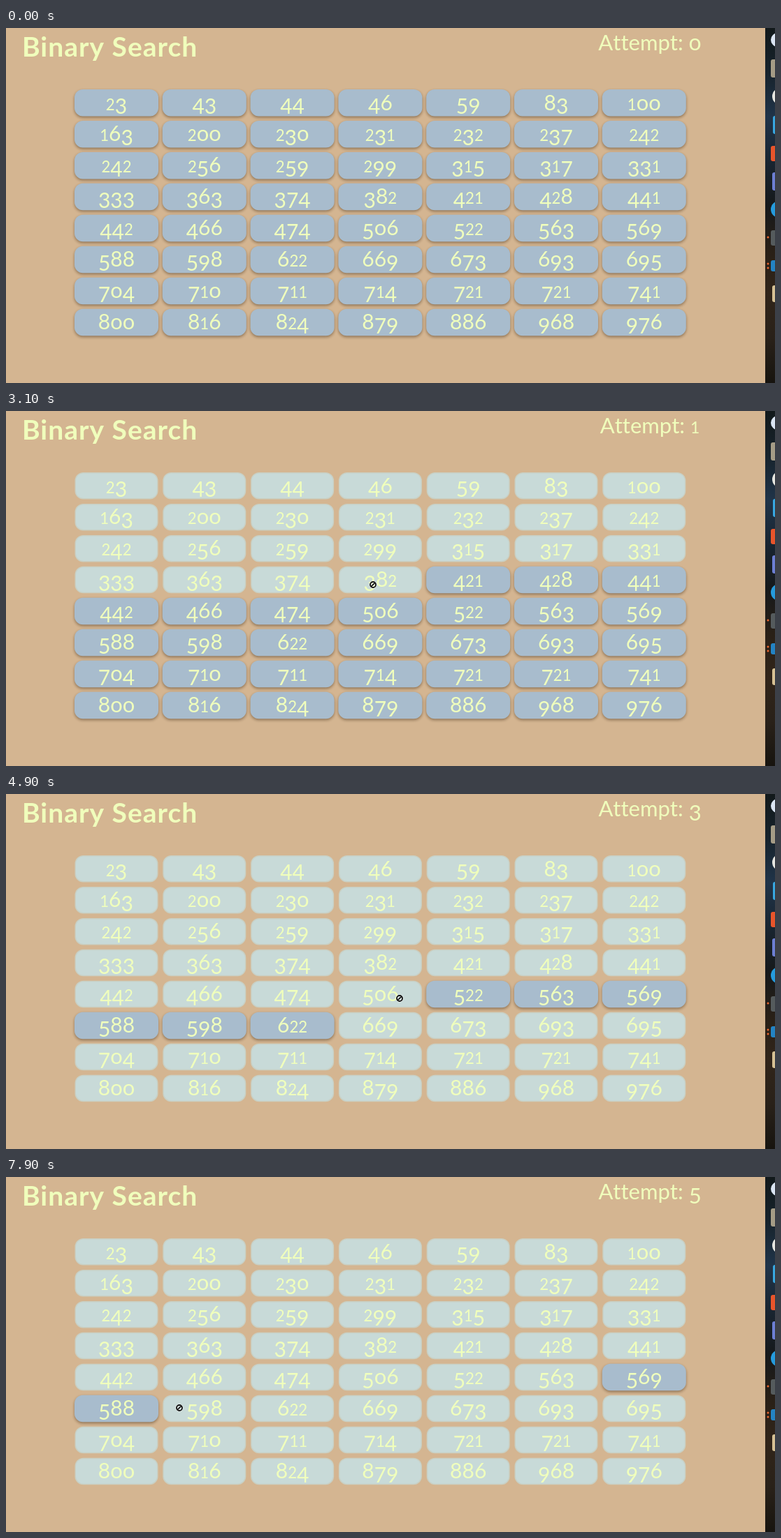
Animation, 1100 px wide and 509 px high, one loop 8000 ms. Source, as an HTML page with a canvas:

```html
<!DOCTYPE html>
<html lang="en">
<head>
<meta charset="utf-8">
<title>Binary Search</title>
<style>
html, body { margin: 0; width: 100%; height: 100%; overflow: hidden; background: #d4b591; }
canvas { display: block; }
</style>
</head>
<body>
<canvas id="stage" width="1100" height="509"></canvas>
<script>
const ctx = document.getElementById('stage').getContext('2d');
const LOOP = 8000;
const INK = '#f0ffbc';
const numbers = `23 43 44 46 59 83 100 163 200 230 231 232 237 242
  242 256 259 299 315 317 331 333 363 374 382 421 428 441
  442 466 474 506 522 563 569 588 598 622 669 673 693 695
  704 710 711 714 721 721 741 800 816 824 879 886 968 976`.split(/\s+/);

// Search range [lo, hi) from each time on
const ranges = [
  [0, 0, 56], [1600, 25, 56], [3900, 25, 38], [4900, 32, 38], [6200, 34, 38], [7400, 34, 36]
];
// Button held down: start, end, index
const presses = [[3800, 3900, 38], [4800, 4900, 31], [6100, 6200, 33], [7300, 7400, 36]];
// Pointer: time, x, y, shape
const pointer = [
  [0, 0, 0, null],
  [800, 144, 20, arrow], [900, 224, 66, arrow], [1000, 342, 140, hand], [1100, 450, 208, hand],
  [1200, 504, 234, hand], [1400, 522, 242, hand], [1600, 521, 243, blocked],
  [3100, 525, 249, blocked], [3200, 535, 266, arrow], [3300, 545, 284, hand], [3400, 551, 298, hand],
  [3600, 558, 318, hand], [3700, 561, 327, hand], [3800, 562, 329, hand], [3900, 562, 330, blocked],
  [4600, 563, 317, blocked], [4700, 564, 300, hand], [4800, 563, 293, hand], [4900, 563, 293, blocked],
  [5500, 580, 292, hand], [5600, 700, 302, hand], [5700, 802, 299, hand],
  [5900, 804, 298, hand], [6200, 807, 298, blocked], [6500, 802, 298, blocked],
  [6700, 730, 312, blocked], [6800, 569, 348, blocked], [6900, 330, 351, hand], [7000, 232, 345, hand],
  [7200, 258, 336, hand], [7300, 272, 332, hand], [7400, 273, 332, blocked],
  [7700, 268, 332, blocked], [7900, 248, 331, blocked]
];
// Desktop edge: y, half height, left edge, colour, round
const icons = [
  [17, 10, 1094, '#dbe5f3', 1], [58, 13, 1094, '#a59c86'], [98, 12, 1096, '#e6e6e0', 1],
  [139, 13, 1097, '#38a7e0'], [180, 11, 1094, '#e9552b'], [220, 13, 1096, '#6d7fd4'],
  [260, 12, 1094, '#259bdd', 1], [301, 11, 1094, '#555b5d'], [341, 8, 1094, '#2383c4'],
  [381, 12, 1096, '#d6c194']
];

const at = (list, t) => list.filter(row => row[0] <= t).pop();
const font = (size, weight = 400) => `${weight} ${size}px Lato, "Open Sans", sans-serif`;

function box(x, y, w, h, r, fill) {
  ctx.beginPath();
  ctx.roundRect(x, y, w, h, r);
  ctx.fillStyle = fill;
  ctx.fill();
}

// Old-style figures: 0-2 sit at x-height, 3 4 5 7 9 hang below the baseline
function glyph(c, size) {
  if (c === '0') return { c: 'o', size: size * 1.03, drop: 0 };
  if (c === '1' || c === '2') return { c, size: size * .74, drop: 0 };
  return { c, size, drop: '34579'.includes(c) ? size * .18 : 0 };
}

function centred(text, x, y, size) {
  const glyphs = [...text].map(c => {
    const g = glyph(c, size);
    ctx.font = font(g.size);
    return { ...g, width: ctx.measureText(g.c).width };
  });
  x -= glyphs.reduce((sum, g) => sum + g.width, 0) / 2;
  ctx.fillStyle = INK;
  for (const g of glyphs) {
    ctx.font = font(g.size);
    ctx.fillText(g.c, x, y + g.drop);
    x += g.width;
  }
}

function button(i, enabled, pressed) {
  const x = 98 + i % 7 * 125.8, y = 88 + Math.floor(i / 7) * 44.95;
  ctx.save();
  if (enabled && !pressed) {
    ctx.shadowColor = 'rgba(70,45,20,.5)';
    ctx.shadowBlur = 4;
    ctx.shadowOffsetY = 2;
  }
  if (enabled) box(x, y, 120, 38.5, 12, '#a8bccd');
  else {
    box(x + .5, y, 119, 38.5, 12, '#c9d0c4');
    box(x + 2, y + 1.5, 116, 35.5, 10.5, '#c8dad8');
  }
  ctx.restore();
  centred(numbers[i], x + 60, y + 29.5, 30);
}

function outline(points) {
  ctx.beginPath();
  points.forEach(([x, y]) => ctx.lineTo(x, y));
  ctx.closePath();
  ctx.fillStyle = '#fff';
  ctx.strokeStyle = '#222';
  ctx.lineWidth = 1;
  ctx.lineJoin = 'round';
  ctx.fill();
  ctx.stroke();
}

function arrow() {
  outline([[0, 0], [0, 13], [3, 10], [5, 15], [7, 14], [5, 9.5], [9, 9.5]]);
}

function hand() {
  outline([[-1, -1], [1, -1], [2, 3], [6, 4], [7, 6], [6, 10], [0, 10], [-3, 5], [-2, 4], [0, 6]]);
}

function blocked() {
  for (const [color, width] of [['rgba(255,255,255,.65)', 3], ['#111', 1.8]]) {
    ctx.beginPath();
    ctx.arc(0, 0, 4, 0, 7);
    ctx.moveTo(-2.7, 2.7);
    ctx.lineTo(2.7, -2.7);
    ctx.strokeStyle = color;
    ctx.lineWidth = width;
    ctx.stroke();
  }
}

function desktop() {
  const shade = ctx.createLinearGradient(0, 0, 0, 509);
  ['#12191b', '#17232c', '#203449', '#192531', '#16191b', '#292017', '#31251a', '#292119', '#17140f']
    .forEach((color, i) => shade.addColorStop(i / 8, color));
  ctx.fillStyle = shade;
  ctx.fillRect(1086, 0, 14, 509);
  for (const [y, r, x, color, round] of icons)
    box(x, y - r, 2 * r, 2 * r, round ? r : 3, color);
  for (const y of [300, 338, 344]) box(1088.5, y - 1.5, 3, 3, 1.5, '#e9662f');
}

function draw(t) {
  const [, lo, hi] = at(ranges, t);
  const attempt = ranges.filter(r => r[0] <= t).length - 1;
  ctx.fillStyle = '#d4b591';
  ctx.fillRect(0, 0, 1100, 509);
  desktop();

  ctx.fillStyle = INK;
  ctx.font = font(39, 700);
  ctx.letterSpacing = '1px';
  ctx.fillText('Binary Search', 23, 41);
  ctx.letterSpacing = '0px';
  centred('Attempt: ' + attempt, 921, 32, 31);

  numbers.forEach((_, i) => button(i, i >= lo && i < hi,
    presses.some(([from, to, index]) => index === i && t >= from && t < to)));

  const [, x, y, shape] = at(pointer, t);
  if (shape) {
    ctx.save();
    ctx.translate(x, y);
    shape();
    ctx.restore();
  }
}

const start = performance.now();
function tick() {
  draw((performance.now() - start) % LOOP);
  requestAnimationFrame(tick);
}
tick();
</script>
</body>
</html>
```
